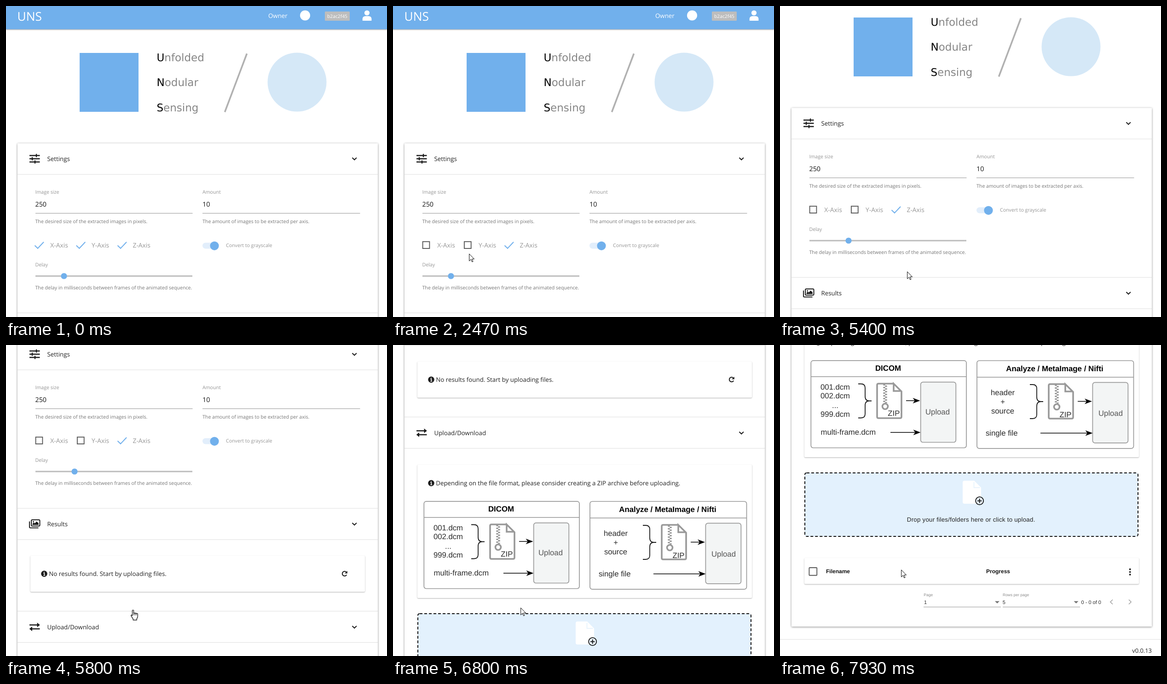
An HTML page that plays this animation: 828 px wide and 676 px high, repeating every 8000 ms.

```html
<!DOCTYPE html>
<html lang="en">
<head>
<meta charset="utf-8">
<title>Image extraction</title>
<style>
  html, body { margin: 0; width: 100%; height: 100%; overflow: hidden; background: #fff; }
  svg { display: block; }
  text { font-family: "Open Sans", "Noto Sans", sans-serif; font-size: 13.3px; fill: #222; white-space: pre; text-rendering: geometricPrecision; }
  .small { font-size: 10.62px; fill: #757575; }
  .label { font-size: 10.62px; fill: #949494; }
  .value { font-size: 14.3px; fill: #111; }
  .axis { font-size: 13.8px; fill: #979797; }
  .light { fill: #fff; }
  .brand { font: 23px "DejaVu Sans", sans-serif; fill: #868686; }
  .brand tspan { fill: #000; }
  .arial text { font: 16.7px "Liberation Sans", Arial, sans-serif; fill: #2b2b2b; }
  .arial .title { font-weight: bold; font-size: 16.85px; fill: #000; }
  .arial .btn { fill: #555; }
  .arial .head { font-weight: bold; font-size: 12px; fill: #111; }
  .arial .drop { font-size: 13.3px; letter-spacing: .25px; fill: #222; }
  .arial .page { font-size: 11px; }
  .arial .tiny { font-size: 8.5px; fill: #8a8a8a; }
  .mid { text-anchor: middle; }
  .end { text-anchor: end; }
  .line { stroke: #dedede; }
  .rule { stroke: #959595; }
  .ink { fill: none; stroke: #1c1c1c; stroke-width: 2; }
  .blue { fill: #71b0ec; }
  .tick { fill: none; stroke: #71b0ec; stroke-width: 2; }
  .empty { fill: none; stroke: #595959; stroke-width: 1.9; }
  .card { fill: #fff; filter: drop-shadow(0 1px 2px rgba(0,0,0,.45)); }
  .panel { fill: #fff; filter: drop-shadow(0 1.5px 1px rgba(0,0,0,.32)); }
  .frame { fill: #fff; stroke: #999; stroke-width: 1.7; }
  .upload { fill: #f3f5f5; stroke: #999; stroke-width: 1.7; }
</style>
</head>
<body>
<svg width="828" height="676" viewBox="0 0 828 676">
  <defs>
    <path id="chevron" class="ink" d="M752.5 -2.3l4.7 4.6 4.7-4.6"/>
    <g id="info">
      <circle cx="83" r="6.7" fill="#1c1c1c"/>
      <path d="M81.4-1.2h2v4.4M81.2 3.4h4M82-3.6h1.8" stroke="#fff" stroke-width="1.6" fill="none"/>
    </g>
    <path id="check" class="tick" d="M62.5 520.5l6.5 6.3 13-13.8"/>
    <rect id="box" class="empty" x="64.6" y="512.2" width="14.8" height="14.8"/>
    <path id="brace" class="ink" style="stroke-width:1.8" d="M170 192.5h6q9 0 9 9v18q0 10 9 10h5h-5q-9 0-9 10v18q0 9-9 9h-6"/>
    <g id="zip" fill="none" stroke="#999" stroke-width="3.6">
      <path d="M247 192h-33q-3 0-3 3v69q0 3 3 3h47q3 0 3-3v-55l-17-17v16h17"/>
      <path d="M226.5 193v41" stroke-width="4.4" stroke-dasharray="3 3"/>
      <path d="M230.5 196v38" stroke-width="4.4" stroke-dasharray="3 3"/>
      <circle cx="228.5" cy="241.5" r="6" fill="#fff"/>
    </g>
    <path id="tip" d="M0 0l-16-6 4.5 6-4.5 6z"/>
    <path id="caret" d="M-5-2.3h10l-5 5z" fill="#757575"/>
  </defs>

  <g id="sheet">
    <rect x="0" y="-10" width="828" height="60.5" class="blue" style="filter:drop-shadow(0 1.5px 1.2px rgba(0,0,0,.4))"/>
    <text x="24.5" y="32" class="light" style="font-size:26.3px">UNS</text>
    <text x="570" y="26" class="light">Owner</text>
    <circle cx="650" cy="20.5" r="11" fill="#fff"/>
    <rect x="693" y="12" width="54" height="20" rx="1.5" fill="#bdbdbd"/>
    <text x="720" y="25.7" class="light mid" style="font-size:10.3px">b2ac2f45</text>
    <circle cx="784.5" cy="15" r="5.6" fill="#fff"/>
    <path d="M774.8 32v-3.5q0-6.5 6.5-6.5h6.6q6.5 0 6.5 6.5v3.5z" fill="#fff"/>

    <rect x="160" y="102" width="128" height="128" class="blue"/>
    <text x="327.5" y="120" class="brand"><tspan>U</tspan>nfolded</text>
    <text x="327.5" y="174" class="brand"><tspan>N</tspan>odular</text>
    <text x="327.5" y="229" class="brand"><tspan>S</tspan>ensing</text>
    <path d="M475.5 230.5l48-127" stroke="#b1b1b1" stroke-width="3.6"/>
    <circle cx="632.5" cy="165.5" r="64" fill="#d5e8f7"/>

    <rect x="25" y="298.5" width="783" height="1353.5" rx="1" class="card"/>
    <path class="line" d="M25 366h783M25 667h783M25 735h783M25 890.5h783M25 958.5h783M0 1680h828"/>

    <path class="ink" style="stroke-width:2.4" d="M51 325h22.5M51 332h22.5M51 339h22.5M66 321.5v7M57 328.5v7M63 335.5v7"/>
    <text x="89.5" y="337.3">Settings</text>
    <use href="#chevron" y="332"/>

    <text x="63.5" y="408.4" class="label">Image size</text>
    <text x="63.5" y="435.6" class="value">250</text>
    <text x="63.5" y="471.8" class="small">The desired size of the extracted images in pixels.</text>
    <text x="427" y="408.4" class="label">Amount</text>
    <text x="427" y="435.6" class="value">10</text>
    <text x="427" y="471.8" class="small">The amount of images to be extracted per axis.</text>
    <path class="rule" d="M64 450.5h341.5M427 450.5h342.5"/>

    <use id="x" href="#check"/>
    <use id="y" href="#check" x="90.3"/>
    <use href="#check" x="180"/>
    <text x="96.3" y="525" class="axis">X-Axis</text>
    <text x="186" y="525" class="axis">Y-Axis</text>
    <text x="275.5" y="525" class="axis">Z-Axis</text>
    <rect x="427" y="514.5" width="35" height="13" rx="6.5" fill="#e2eefb"/>
    <circle cx="453" cy="521.3" r="9.6" class="blue"/>
    <text x="478" y="524.3" class="label">Convert to grayscale</text>

    <text x="63.5" y="566.2" class="label">Delay</text>
    <path d="M64 587h341" stroke="#bcbcbc" stroke-width="2.8"/>
    <text x="63.5" y="616.3" class="small">The delay in milliseconds between frames of the animated sequence.</text>
    <g id="thumb">
      <circle r="6.6" class="blue"/>
      <g id="bubble">
        <path class="blue" d="M0-10.2l-9.9-9.9a14 14 0 1 1 19.8 0z"/>
        <text id="delay" y="-26.3" class="light mid" style="font-size:9px"></text>
      </g>
    </g>

    <g class="ink">
      <rect x="55" y="692" width="18.5" height="13.5" rx="2"/>
      <path d="M51 695.5v12q0 2 2 2h17.5"/>
      <path d="M57.5 703v-2.2l3-3 2 2 4.2-4.2 4 4v3.4z" fill="#1c1c1c" stroke="none"/>
      <circle cx="59.5" cy="696" r="1.5" fill="#1c1c1c" stroke="none"/>
    </g>
    <text x="89.5" y="706.3">Results</text>
    <use href="#chevron" y="701"/>
    <rect x="53" y="770" width="727" height="78.5" rx="2" class="panel"/>
    <use href="#info" y="809.3"/>
    <text x="93.3" y="814.3">No results found. Start by uploading files.</text>
    <path class="ink" d="M739.6 805.8a5 5 0 1 0 .6 5.7"/>
    <path d="M741.8 803v5.6h-5.6z" fill="#1c1c1c"/>

    <path class="ink" style="stroke-width:2.4" d="M51 920.5h17M56 929h17.5"/>
    <path d="M67.5 915.5l6.3 5-6.3 5zM57 924l-6.3 5 6.3 5z" fill="#1c1c1c"/>
    <text x="89.5" y="930.2">Upload/Download</text>
    <use href="#chevron" y="925"/>
    <rect x="53" y="994" width="727" height="290" rx="2" class="panel"/>
    <use href="#info" y="1034.3"/>
    <text x="93.3" y="1039.2">Depending on the file format, please consider creating a ZIP archive before uploading.</text>

    <g class="arial" transform="translate(0 932)">
      <rect x="67.3" y="141.8" width="337.7" height="189.7" rx="5" class="frame"/>
      <path class="rule" stroke-width="1.4" d="M67.5 176.8h337.5M428 178h340.5"/>
      <text x="235" y="164" class="title mid">DICOM</text>
      <text x="88" y="204.7">001.dcm</text>
      <text x="88" y="224.4">002.dcm</text>
      <text x="120" y="244.5" class="mid">...</text>
      <text x="88" y="263.7">999.dcm</text>
      <text x="88.5" y="303.3">multi-frame.dcm</text>
      <use href="#brace"/>
      <use href="#zip"/>
      <text x="247.3" y="262" class="mid">ZIP</text>
      <rect x="305.7" y="188.7" width="76.6" height="130.8" rx="5" class="upload"/>
      <text x="342.5" y="259.3" class="btn mid">Upload</text>

      <rect x="428" y="142" width="340.5" height="190.8" rx="5" class="frame" style="fill:none"/>
      <text x="597" y="165.2" class="title mid">Analyze / MetaImage / Nifti</text>
      <text x="484" y="217.3" class="mid">header</text>
      <text x="484" y="236.5" class="mid">+</text>
      <text x="484" y="257" class="mid">source</text>
      <text x="447" y="304.5">single file</text>
      <use href="#brace" x="373" y="1.5"/>
      <use href="#zip" x="373" y="1"/>
      <text x="620.5" y="264.5" class="mid">ZIP</text>
      <rect x="679.4" y="189.4" width="77" height="131.5" rx="5" class="upload"/>
      <text x="718.5" y="261.8" class="btn mid">Upload</text>

      <path class="ink" style="stroke:#000;stroke-width:1.7" d="M274 229h20M240 298h55M647 230.5h20M566 299.5h102"/>
      <use href="#tip" x="304.5" y="229"/>
      <use href="#tip" x="305.5" y="298"/>
      <use href="#tip" x="678" y="230.5"/>
      <use href="#tip" x="679.5" y="299.5"/>

      <rect x="54" y="386" width="724" height="138" rx="4" fill="#e3f1fd" stroke="#111" stroke-width="2" stroke-dasharray="6 4"/>
      <path d="M401 403h21l15 15v31q0 4-4 4h-32q-4 0-4-4v-42q0-4 4-4z" fill="#fff"/>
      <path d="M421.5 406v12h13" fill="none" stroke="#e3f1fd" stroke-width="1.6"/>
      <circle cx="433.7" cy="446.7" r="8.5" fill="#e9f4fd" stroke="#111" stroke-width="1.8"/>
      <path class="ink" d="M429 446.7h9.4M433.7 442v9.4"/>
      <text x="275.8" y="492.3" class="drop">Drop your files/folders here or click to upload.</text>

      <rect x="53" y="571" width="727" height="56.5" rx="2" class="panel"/>
      <rect x="63.4" y="592" width="16.8" height="16.8" rx="1" class="empty"/>
      <text x="100" y="604.3" class="head">Filename</text>
      <text x="448" y="604.3" class="head">Progress</text>
      <g fill="#1c1c1c">
        <circle cx="760.7" cy="595.5" r="1.9"/><circle cx="760.7" cy="601.3" r="1.9"/><circle cx="760.7" cy="607" r="1.9"/>
      </g>
      <text x="312.3" y="653.5" class="tiny">Page</text>
      <text x="313" y="670.5" class="page">1</text>
      <text x="484" y="653.5" class="tiny">Rows per page</text>
      <text x="483.7" y="670.5" class="page">5</text>
      <text x="654.5" y="670.5" class="page">0 - 0 of 0</text>
      <path class="rule" d="M312 677.5h168M484 677.5h168"/>
      <use href="#caret" x="472" y="667"/>
      <use href="#caret" x="643.5" y="667"/>
      <path class="ink" style="stroke:#a5a5a5;stroke-width:1.7" d="M723 661.5l-5 5 5 5M758 661.5l5 5-5 5"/>
    </g>
    <text x="808" y="1709.3" class="end" style="font-size:12.9px">v0.0.13</text>
  </g>

  <g id="cursor" fill="#fff" stroke="#000" stroke-linejoin="round">
    <path id="arrow" d="M.7.8v15.4l3.6-3.4 2.5 5.4 2.2-1-2.4-5.2h4.9z"/>
    <g id="hand" transform="translate(-5 0)">
      <path stroke-width="1.2" d="M3.5 13V2q0-1.5 1.5-1.5T6.5 2v6q0-1.2 1.4-1.2T9.4 8.2q.1-1 1.4-1t1.5 1.4q.1-.8 1.4-.8t1.5 1.5v5q0 3-2 5v3h-8v-2.5l-4-6q-1-1.6.2-2.2 1.2-.6 2.1 1.4z"/>
      <path d="M6.5 8v4M9.4 8.4v3.6M12.3 9v3" fill="none"/>
    </g>
  </g>
</svg>
<script>
const LOOP = 8000;
const $ = id => document.getElementById(id);

// Each row: time in ms, then values; linear in between.
const pointer = [
  [0, 825, 675], [999, 825, 675], [1000, 296, 654], [1530, 82, 525], [1730, 82, 525],
  [2130, 166, 526], [2330, 166, 526], [2470, 165, 538], [2870, 128, 583], [3130, 128, 583],
  [3400, 127, 590], [3600, 127, 590], [4000, 144, 590], [4330, 150, 590], [4930, 150, 590],
  [5330, 276, 577], [5800, 276, 575.5], [6070, 276, 575.5], [6400, 277, 570.5],
  [6870, 277, 570.5], [7200, 264, 486], [7670, 264, 486], [7930, 263, 488]
];
const scroll = [
  [5270, 0], [5800, 312], [5930, 324], [6000, 324], [6400, 608],
  [6870, 756], [7470, 932], [7670, 932], [7930, 1040]
];
const knob = [[3600, 126], [4000, 143.5], [4330, 149]];
const pop = [[3530, 0], [3730, 1], [4330, 1], [4400, 0]];

// Shape of the pointer from each time on.
const shapes = [
  [0, 'arrow'], [700, ''], [1000, 'arrow'], [1460, 'hand'], [2400, 'arrow'], [2800, 'hand'],
  [5060, 'arrow'], [5730, 'hand'], [6130, 'arrow'], [7130, 'hand'], [7860, 'arrow']
];

function at(track, t, col = 1) {
  const i = track.findIndex(row => row[0] > t);
  if (i === 0) return track[0][col];
  if (i < 0) return track[track.length - 1][col];
  const a = track[i - 1], b = track[i];
  return a[col] + (b[col] - a[col]) * (t - a[0]) / (b[0] - a[0]);
}

const held = (rows, t) => rows.filter(row => row[0] <= t).pop()[1];
const show = (id, on) => $(id).setAttribute('visibility', on ? 'visible' : 'hidden');
const place = (id, value) => $(id).setAttribute('transform', value);

function draw(t) {
  place('sheet', `translate(0 ${-Math.round(at(scroll, t))})`);
  $('x').setAttribute('href', t < 1800 ? '#check' : '#box');
  $('y').setAttribute('href', t < 2330 ? '#check' : '#box');

  const x = at(knob, t);
  place('thumb', `translate(${x} 587)`);
  place('bubble', `scale(${at(pop, t)})`);
  $('delay').textContent = 100 + 2 * Math.round((x - 126) * 13 / 17.5);

  const shape = held(shapes, t);
  place('cursor', `translate(${at(pointer, t)} ${at(pointer, t, 2)})`);
  show('arrow', shape === 'arrow');
  show('hand', shape === 'hand');
}

const start = performance.now();
function run() {
  const t = (performance.now() - start) % LOOP;
  const tick = Math.floor((t + 5) * 3 / 200);
  draw(Math.round(tick * 20 / 3) * 10 % LOOP);
  requestAnimationFrame(run);
}
run();
</script>
</body>
</html>
```
